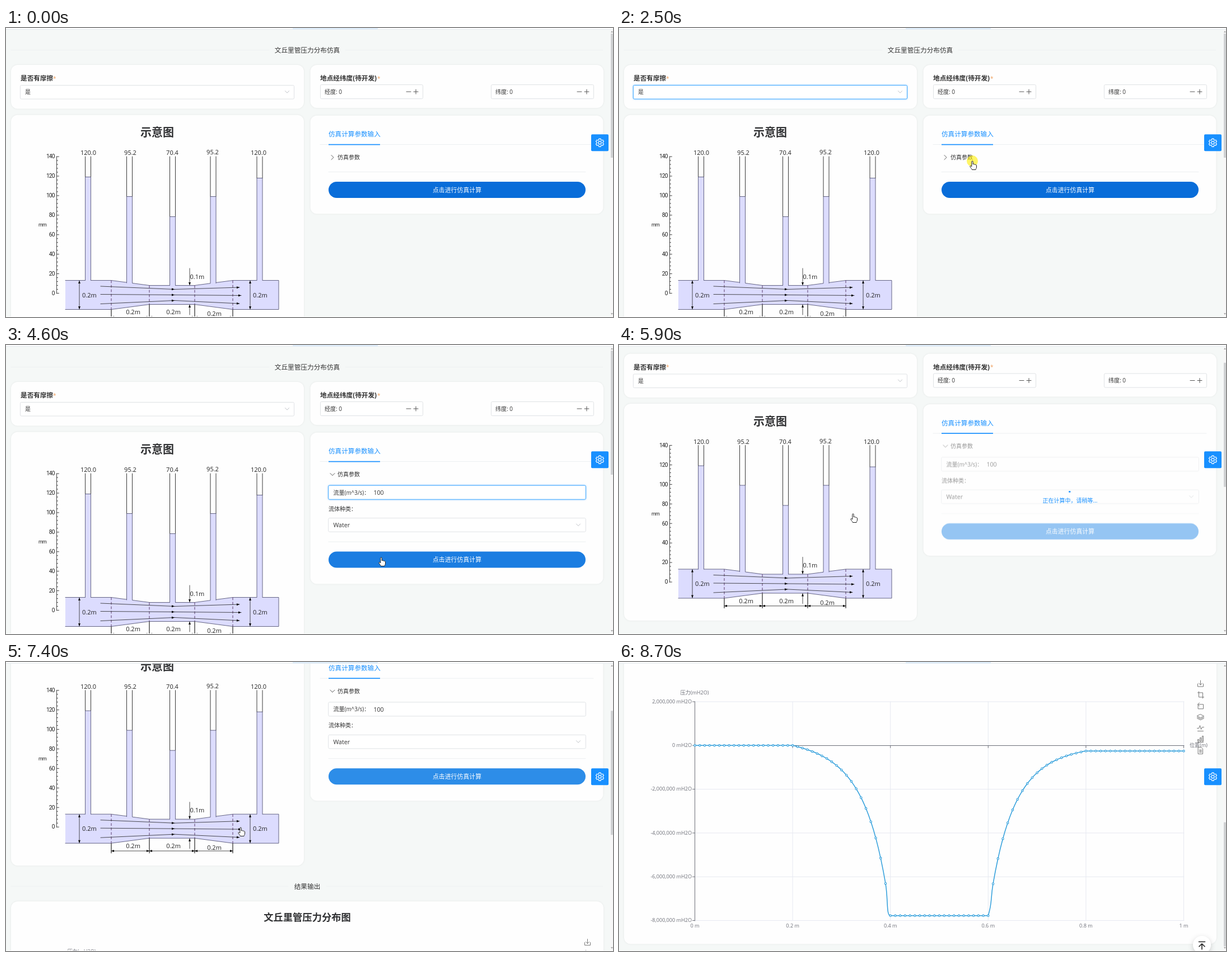
An HTML page for the animation above (9 s loop, 1084x517 px).

```html
<!DOCTYPE html>
<html lang="zh-CN">
<head>
<meta charset="utf-8">
<style>
html, body { margin: 0; height: 100%; overflow: hidden; background: #f5f8f7; }
svg { display: block; width: 100vw; height: 100vh; }
text { font-family: "Open Sans", "Noto Sans CJK SC", "Noto Sans CJK", sans-serif; white-space: pre; }
.scale { font-family: Roboto, sans-serif; letter-spacing: -.9px; }
.card { fill: #fefefe; filter: drop-shadow(0 0 1.5px #00000014); }
.field { fill: #fff; stroke: #dfe2e5; }
.focus { stroke: #40a9ff; filter: drop-shadow(0 0 1.5px #1890ff80); }
.pop { fill: #fff; filter: drop-shadow(0 3px 5px #0000002e); }
.line { fill: none; stroke-linecap: round; stroke-linejoin: round; }
</style>
</head>
<body>
<svg id="stage" viewBox="0 0 1084 517" preserveAspectRatio="none"></svg>
<script>
const LOOP = 9000, BLUE = '#1890ff', INK = '#333', GREY = '#6e7079';
const $ = id => document.getElementById(id);

// Markup helpers; text y is the middle of the glyphs
const text = (x, y, str, size = 10, fill = INK, more = '') =>
  `<text x="${x}" y="${y + size * .37}" font-size="${size}" fill="${fill}" ${more}>${str}</text>`;
const mid = (x, y, str, size, fill, more = '') => text(x, y, str, size, fill, 'text-anchor="middle" ' + more);
const end = (x, y, str, size, fill, more = '') => text(x, y, str, size, fill, 'text-anchor="end" ' + more);
const rect = (x, y, w, h, more = '') => `<rect x="${x}" y="${y}" width="${w}" height="${h}" ${more}/>`;
const path = (d, stroke = '#222', width = 1, more = '') =>
  `<path class="line" d="${d}" stroke="${stroke}" stroke-width="${width}" ${more}/>`;
const card = (x, y, w, h, more = '') => rect(x, y, w, h, 'rx="12" class="card" ' + more);
const field = (x, y, w, h, more = '') => rect(x + .5, y + .5, w, h, 'rx="2" class="field" ' + more);
const chevron = (x, y) => path(`M${x - 3.5} ${y - 2}l3.5 3.7 3.5-3.7`, '#bfc3c8');
const BOLD = 'font-weight="700"';

function arrow(x1, y1, x2, y2, both) {
  const a = Math.atan2(y2 - y1, x2 - x1) * 180 / Math.PI;
  const head = (x, y, r) => `<path d="M0 0l-5-2v4z" transform="translate(${x} ${y}) rotate(${r})"/>`;
  return path(`M${x1} ${y1}L${x2} ${y2}`, '#222', .8) + head(x2, y2, a) + (both ? head(x1, y1, a + 180) : '');
}

function heading(y, str, half) {
  return path(`M9 ${y - .5}H${528 - half}M${548 + half} ${y - .5}H1066`, '#eef1f1') + mid(538, y, str, 11.65, '#333');
}

function numberBox(x, label) {
  return field(x, 101, 183, 25) + text(x + 8, 114, label + ': 0') +
    path(`M${x + 154} 114h8M${x + 167} 114h8M${x + 171} 110v8`, '#555');
}

function diagram() {
  let out = mid(270, 187, '示意图', 20, '#303133', BOLD);
  let ticks = 'M90.5 230V475';
  for (let v = 0; v <= 140; v += 4) {
    const y = 474.5 - v * 1.746;
    ticks += `M90.5 ${y}h${v % 20 ? 2 : 4}`;
    if (v % 20 == 0) out += end(86.5, y - .5, v, 10.2, '#222', 'class="scale"');
  }
  out += path(ticks, '#333', .9) + text(58, 352, 'mm', 9, '#222', 'class="scale"');

  const wall = '#555577', water = '#dcdcfe';
  const upper = 'M106 451.5H188L256 460.5H337L405 451.5H487', lower = 'V503.5H405L337 494.5H256L188 503.5H106';
  out += `<path d="${upper + lower}z" fill="${water}"/>` + path(upper + lower, wall, .9);
  const tubes = [[141.5, 266.5, 451.5, '120.0', 147, 223], [215.5, 301.5, 456, '95.2', 222, 223],
    [292.5, 337.5, 460.5, '70.4', 297, 223], [365, 301.5, 456.5, '95.2', 369, 222], [448, 268.5, 451.5, '120.0', 451, 223]];
  for (const [x, level, foot, label, cx, cy] of tubes) {
    const r = x + 10;
    out += rect(x, level, 10, foot - level + 2, `fill="${water}"`) +
      path(`M${x} ${level}V230M${r} 230V${level}`, '#222', .9) +
      path(`M${x} ${foot}V${level}H${r}V${foot}`, wall, .9) + mid(cx, cy, label, 11, '#222');
  }
  for (const x of [188, 256, 337, 405]) {
    const inner = x > 200 && x < 400;
    out += path(`M${x} ${inner ? 461 : 452}V${inner ? 494 : 503}`, '#5a3a6a', 1, 'stroke-dasharray="4 4"') +
      path(`M${x} ${inner ? 495 : 504}V521`, '#222', 1.2);
  }
  for (const [a, b, c, tip] of [[462, 467.5, 464, 417], [476.5, 477.5, 478.5, 420], [493.5, 487.5, 493, 417]])
    out += arrow(169, a, 301, b) + arrow(301, b, tip, c);
  for (const x of [131, 436]) out += arrow(x, 452, x, 503, true) + text(x + 5, 477.5, '0.2m', 11, '#222');
  out += arrow(328, 430, 328, 460) + arrow(328, 513, 328, 495) + text(328.5, 444.5, '0.1m', 11, '#222');
  for (const [a, b, cx, y] of [[188, 256, 227, 508], [256, 337, 299, 508], [337, 405, 372, 511]])
    out += arrow(a, 517.3, b, 517.3, true) + mid(cx, y, '0.2m', 11, '#222');
  return out;
}

// Pressure in a pipe whose bore narrows from 0.2 m to 0.1 m, plus a small loss
function pressure(x) {
  const s = x <= .2 ? 0 : x < .4 ? (x - .2) / .2 : x <= .6 ? 1 : x < .8 ? (.8 - x) / .2 : 0;
  const loss = 10 * Math.min(1, Math.max(0, (x - .6) / .2));
  return 149.3 + 20.3 * ((1 - s / 2) ** -4 - 1) + loss;
}

// Smooth line whose handles stay between neighbouring points
function smooth(p) {
  const clamp = (v, a, b) => Math.max(Math.min(a, b), Math.min(Math.max(a, b), v));
  const len = (a, b) => Math.hypot(b[0] - a[0], b[1] - a[1]);
  let d = 'M' + p[0], out = p[0];
  for (let i = 1; i < p.length; i++) {
    const a = p[i - 1], c = p[i], n = p[i + 1];
    let inn = c, next = c;
    if (n) {
      const l0 = len(a, c), l1 = len(c, n);
      next = c.map((v, k) => clamp(v + (n[k] - a[k]) * .5 * l1 / (l0 + l1), v, n[k]));
      inn = c.map((v, k) => clamp(v - (next[k] - v) * l0 / l1, a[k], v));
    }
    d += `C${out} ${inn} ${c}`;
    out = next;
  }
  return d;
}

function chart() {
  let out = '', grid = '', ticks = 'M135.5 71V463M135 149.5H1009';
  for (let k = 0; k < 6; k++) {
    const x = 135.5 + k * 174.6, y = 71 + k * 78.3;
    grid += `M${x} 71V462.5M135 ${y}H1009`;
    ticks += `M${x} 149.5v4M135.5 ${y}h-4`;
    out += end(130, y - .5, (2e6 - k * 2e6).toLocaleString('en-US') + ' mH2O', 9.1, GREY) +
      mid(x, 471.5, +(k * .2).toFixed(1) + ' m', 9.1, GREY);
  }
  const pts = Array.from({ length: 101 }, (_, i) => [135.5 + i * 8.73, pressure(i / 100)]);
  const dots = pts.map(([x, y]) => `<circle cx="${x}" cy="${y}" r="1.7"/>`).join('');
  const icons = ['M-5 0v5h10v-5M0-6v8m-3-3l3 3 3-3', 'M-3-6v10h9M-5-4h9v10', 'M-4-3h9v8h-9zM-2-6l-3 3 3 3',
    'M0-5l6 3-6 3-6-3zM-6 0l6 3 6-3M-6 2l6 3 6-3', 'M-5 5h10M-6 0h3l2-5 2 7 2-4h3',
    'M-5 5h10M-5 3v-3h2v3zM-1 3v-6h2v6zM3 3v-9h2v9z', 'M-4-6h5l3 3v9h-8zM-2-1h4M-2 1h4M-2 3h4'];
  return path(grid, '#e6e9f1') + path(ticks, GREY) + out +
    mid(135, 55, '压力(mH2O)', 9.1, GREY) + text(1019, 149, '位置(m)', 9.1, GREY) +
    icons.map((d, i) => path(d, '#777', 1, `transform="translate(1038.5 ${39 + i * 19.9})"`)).join('') +
    path(smooth(pts), '#2f9edb', 1.5) + `<g fill="#fff" stroke="#2f9edb" stroke-width="1.1">${dots}</g>`;
}

function gear() {
  let d = '';
  for (let k = 0; k < 6; k++)
    for (const [a, r] of [[-13, 7.3], [13, 7.3], [22, 5.4], [38, 5.4]]) {
      const w = (k * 60 + 30 + a) * Math.PI / 180;
      d += `${d ? 'L' : 'M'}${1060.5 + r * Math.cos(w)} ${205.2 + r * Math.sin(w)}`;
    }
  return rect(1045, 190.2, 31, 30, `rx="2" fill="${BLUE}"`) + path(d + 'z', '#fff', 1.2) +
    '<circle cx="1060.5" cy="205.2" r="2.6" fill="none" stroke="#fff" stroke-width="1.2"/>';
}

$('stage').innerHTML = `
<clipPath id="reveal"><rect id="revealBox" x="560" y="246" width="490" height="0"/></clipPath>
${rect(0, 0, 1084, 517, 'fill="#f5f8f7"')}
<g id="page">
  ${heading(40, '文丘里管压力分布仿真', 58)}
  ${card(9, 66, 523, 78.5)}${card(9, 155.5, 523, 388)}${card(543.5, 66, 523.5, 77)}
  ${card(543.5, 156.5, 523, 176, 'id="panel"')}
  ${text(26, 90, '是否有摩擦', 11.65, INK, BOLD)}${text(84, 90, '*', 10, '#f0a060')}
  ${field(25, 102, 489, 24.5, 'id="friction"')}${text(34, 114.5, '是')}${chevron(502, 114.5)}
  ${text(561, 90, '地点经纬度(待开发)', 11.65, INK, BOLD)}${text(663, 90, '*', 10, '#f0a060')}
  ${numberBox(561, '经度')}${numberBox(866, '纬度')}
  ${diagram()}
  ${path('M561 208.5H1049', '#eceff1')}${rect(576, 207.7, 92, 1.7, `fill="${BLUE}"`)}
  ${text(576, 190, '仿真计算参数输入', 11.6, BLUE)}
  <g id="form">
    ${path('M-2-4l4 4-4 4', '#444', .9, 'id="caret"')}${text(592, 231.7, '仿真参数')}
    <g clip-path="url(#reveal)">
      ${field(575.3, 250.7, 459.5, 25, 'id="flow"')}${text(584.5, 264, '流量(m^3/s)：')}
      ${text(656.5, 264, '', 10.6, INK, 'id="value"')}
      ${text(576, 293, '流体种类：')}
      ${field(575.3, 309.2, 459.5, 24.5)}${text(584.5, 322, 'Water', 10.6)}${chevron(1022, 322)}
    </g>
    <g id="lower">
      ${path('M576 257.5H1035', '#eceff1')}
      ${rect(576, 275, 459, 29, 'rx="14.5" id="button"')}${mid(805.5, 289.5, '点击进行仿真计算', 10.9, '#fff')}
    </g>
  </g>
  <g id="spin">${rect(803, 311.8, 3.5, 2.5, `rx="1" fill="${BLUE}"`)}${mid(805.5, 328.5, '正在计算中，请稍等...', 10, BLUE)}</g>
  ${heading(580.8, '结果输出', 24)}
  ${card(9, 607.5, 1058, 539)}${mid(538, 636, '文丘里管压力分布图', 17.3, '#303133', BOLD)}
  <g transform="translate(0 642)">${chart()}</g>
  <g id="menu">
    ${rect(25.5, 130, 489, 55, 'rx="2" class="pop"')}${rect(28, 134, 484, 23, 'fill="#f2f2f2"')}
    ${text(34, 145.5, '是', 10, BLUE)}${path('M499 146l3 3 5-6', BLUE, 1.3)}${text(34, 169.5, '否')}
  </g>
</g>
<g id="cross">
  ${path('', '#888', 1, 'id="crossLines" stroke-dasharray="4 3"')}
  <g id="yTag">${rect(57, -8, 74, 16, `rx="2" fill="${GREY}"`)}${end(128, 0, '', 9.1, '#fff', 'id="yText"')}</g>
  <g id="xTag">${rect(-20, 465, 40, 16, `rx="2" fill="${GREY}"`)}${mid(0, 473, '', 9.1, '#fff', 'id="xText"')}</g>
</g>
${rect(0, 0, 1084, 2, 'fill="#fff"')}${rect(0, 2, 1084, 1, 'fill="#e3eaee"')}${rect(512, 0, 152, 2.5, 'fill="#dfeefb"')}
${rect(0, 516, 1084, 1, 'fill="#fff"')}
${rect(1079, 3, 5, 513, 'fill="#f7f7f7"')}${rect(1080, 0, 4, 222, 'id="thumb" fill="#cfd1d3"')}
<path d="M1080 8l2-3 2 3zM1080 510l2 3 2-3z" fill="#aaa"/>
${gear()}
<g id="toTop"><circle cx="1041" cy="506" r="16" class="pop"/>${path('M1035.5 500.5h11M1041 514v-10m-5 5l5-5 5 5', '#222', 1.6)}</g>
<g id="pointer">
  <circle id="halo" r="10" fill="#ffee00" opacity=".6"/>
  <path id="hand" fill="#fff" stroke="#222" stroke-width="1" stroke-linejoin="round" d="M-1.2 1.2C-1.2-.5 1.2-.5 1.2 1.2V6C1.5 4.9 3.3 5 3.5 6.3 4 5.5 5.5 5.7 5.7 6.9 6.2 6.3 7.5 6.7 7.5 7.9V11C7.5 13 6 14 6 15.5H-.6C-.6 14.3-2 13.3-4 10.2-4.7 9-3.3 8-2.2 9L-1.2 10Z"/>
  ${path('M-2-4h4M0-4V11M-2 11h4', '#222', 1, 'id="beam"')}
</g>`;

// Eased value of time-stamped keys [time, ...values]
function at(t, keys) {
  let i = keys.findIndex(k => k[0] > t);
  if (i < 0) i = keys.length;
  const a = keys[Math.max(0, i - 1)], b = keys[Math.min(i, keys.length - 1)];
  const u = b[0] > a[0] ? Math.max(0, (t - a[0]) / (b[0] - a[0])) : 0, e = u * u * (3 - 2 * u);
  return a.slice(1).map((v, k) => v + (b[k + 1] - v) * e);
}
const within = (t, a, b) => t >= a && t < b;
const show = (id, on) => $(id).setAttribute('visibility', on ? 'visible' : 'hidden');
const set = (id, name, v) => $(id).setAttribute(name, v);

const MOVES = [[0, 600, -40], [100, 598, -8], [500, 407, 107], [1000, 407, 107], [1300, 409, 142], [1400, 409, 142],
  [1600, 652, 262], [1700, 634, 244], [1800, 631, 238], [3000, 631, 238], [3300, 670, 264], [4400, 670, 264],
  [4600, 670, 380], [4800, 670, 380], [5300, 418, 302], [6900, 418, 302], [7400, 419, 296], [8200, 419, 296], [8700, 470, -30]];
const SCROLL = [[5300, 0], [5900, 50.5], [7000, 50.5], [7400, 179.3], [7900, 642]];
const CLICKS = [[800, 1000], [1300, 1400], [2400, 2600], [3300, 3400], [4700, 4800]];

function draw(t) {
  const [x, y] = at(t, MOVES), [scroll] = at(t, SCROLL);
  const [open] = at(t, [[2500, 0], [2900, 1]]), [hover] = at(t, [[4500, 0], [4700, 1]]);
  const [fade] = at(t, [[4700, 1], [5000, .5], [7100, .5], [7400, 1]]);
  const [menu] = at(t, [[700, 0], [1000, 1], [1300, 1], [1500, 0]]);

  set('page', 'transform', `translate(0 ${-scroll})`);
  set('thumb', 'y', 10 + scroll * .431);
  show('toTop', scroll > 400);

  set('friction', 'class', 'field' + (within(t, 500, 2600) ? ' focus' : ''));
  set('menu', 'opacity', menu);
  set('menu', 'transform', `translate(0 ${130 * (1 - (.8 + .2 * menu))}) scale(1 ${.8 + .2 * menu})`);

  set('panel', 'height', 176 + 95 * open);
  set('revealBox', 'height', 94.5 * open);
  set('lower', 'transform', `translate(0 ${94.5 * open})`);
  set('caret', 'transform', `translate(583 231.5) rotate(${90 * open})`);
  set('flow', 'class', 'field' + (within(t, 3300, 4700) ? ' focus' : ''));
  $('value').textContent = t < 3700 ? '' : t < 3900 ? '1' : t < 4000 ? '10' : '100';
  const tint = [[9, 45], [109, 141], [217, 232]].map(([a, b]) => Math.round(a + (b - a) * hover));
  set('button', 'fill', `rgb(${tint})`);
  set('form', 'opacity', fade);
  show('spin', within(t, 4800, 7200));

  const inside = within(t, 8300, 8700) && y > 71;
  show('cross', inside);
  if (inside) {
    set('crossLines', 'd', `M135 ${y}H1009M${x} 71V463`);
    set('yTag', 'transform', `translate(0 ${y})`);
    set('xTag', 'transform', `translate(${x} 0)`);
    $('yText').textContent = Math.round((149.3 - y) / 78.3 * 2e6).toLocaleString('en-US') + ' mH2O';
    $('xText').textContent = ((x - 135.5) / 873).toFixed(2) + ' m';
  }

  const typing = within(t, 3200, 4400);
  set('pointer', 'transform', `translate(${x} ${y})`);
  show('halo', CLICKS.some(c => within(t, ...c)));
  show('hand', t > 0 && !typing && t < 8700);
  show('beam', typing && t < 3700);
}

function tick() {
  draw(Math.floor(performance.now() % LOOP / 100) * 100);
  requestAnimationFrame(tick);
}
tick();
</script>
</body>
</html>
```
